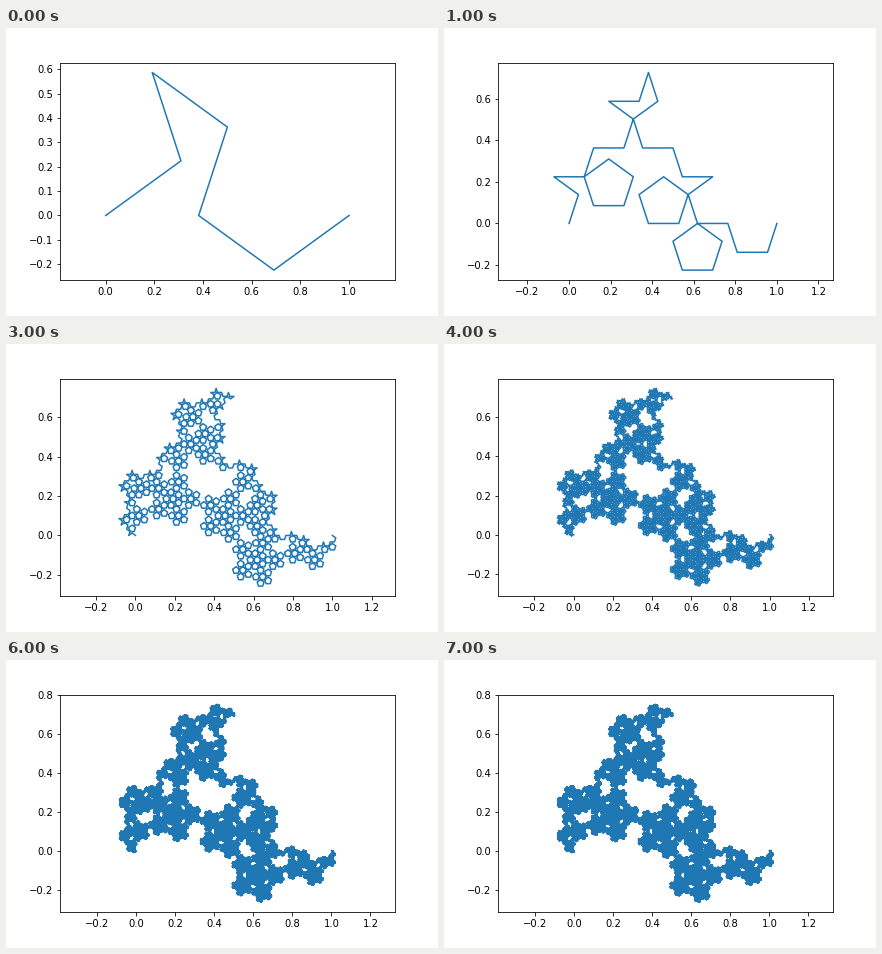
Write a matplotlib script that moves like this. It is 432 px wide and 288 px high and loops after 8000 ms.

```python
import numpy as np
import matplotlib.pyplot as plt
from matplotlib.animation import FuncAnimation

DEPTHS = 8
STEP_MS = 1000
TURNS = np.radians([36, 108, -36, -108, -36, 36])
RATIO = (3 - np.sqrt(5)) / 2

plt.rcParams["agg.path.chunksize"] = 20000


def pentigree(depth):
    """Vertices of the curve from 0 to 1 after `depth` substitutions."""
    motif = RATIO * np.exp(1j * TURNS)
    steps = np.ones(1, dtype=complex)
    for _ in range(depth):
        steps = np.outer(steps, motif).ravel()
    return np.concatenate(([0], np.cumsum(steps)))


fig, ax = plt.subplots(figsize=(6, 4), dpi=72)


def draw(frame):
    ax.clear()
    z = pentigree(frame + 1)
    line, = ax.plot(z.real, z.imag, color="tab:blue", lw=1.5)
    ax.axis("equal")
    return [line]


fig.subplots_adjust(left=0.125, right=0.9, bottom=0.125, top=0.88)
anim = FuncAnimation(fig, draw, frames=DEPTHS, init_func=lambda: [],
                     interval=STEP_MS, repeat=True, repeat_delay=0)
plt.show()
```
